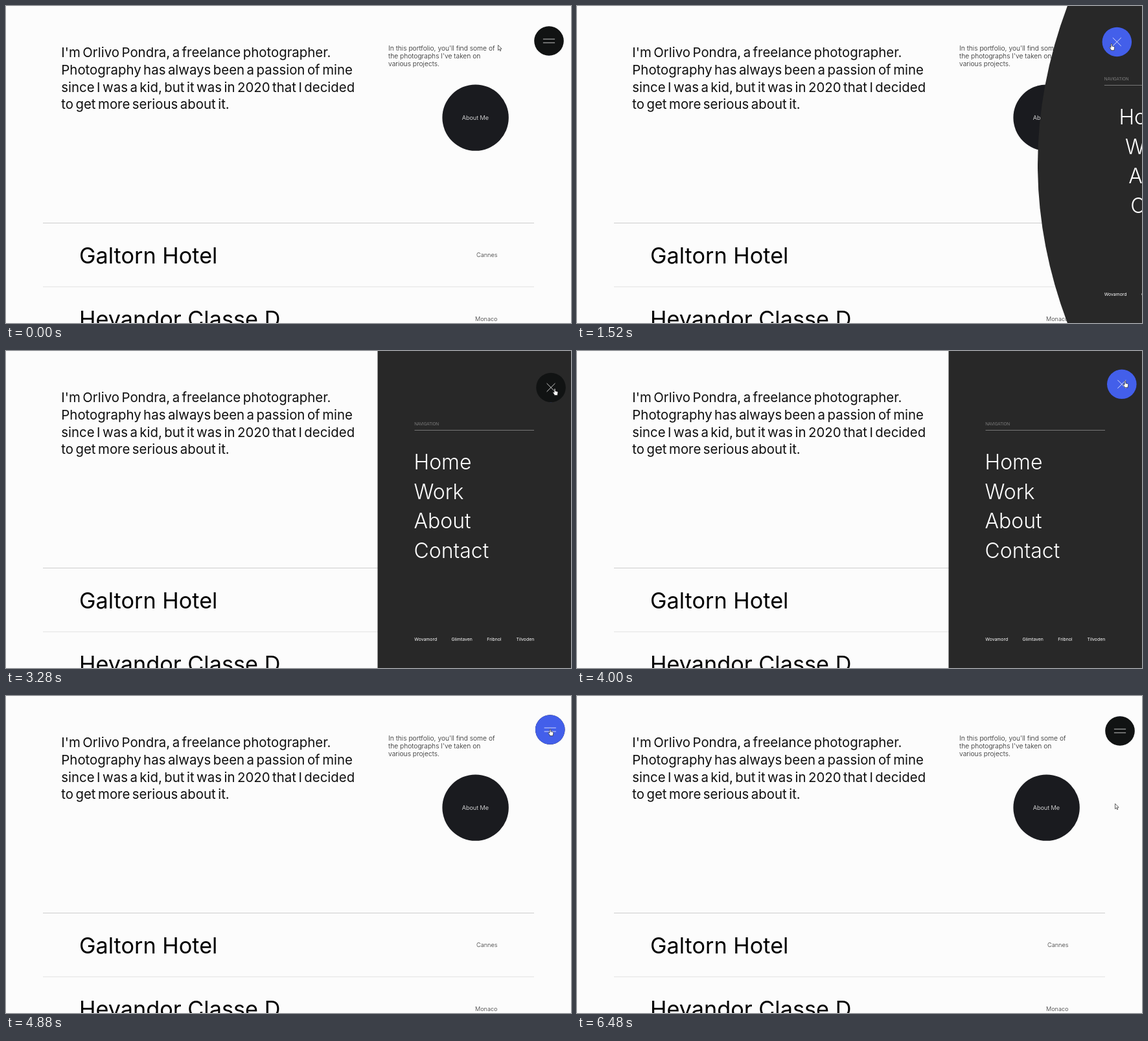
Write an HTML page that moves like this. It is 872 px wide and 490 px high and loops after 6.72 s.

```html
<!DOCTYPE html>
<html lang="en">
<head>
<meta charset="utf-8">
<title>Portfolio side menu</title>
<style>
  html, body { margin: 0; width: 100%; height: 100%; overflow: hidden; background: #fcfcfc; }
  svg { display: block; width: 872px; height: 490px; font-family: Inter, sans-serif; }
  .intro { font-size: 20.4px; word-spacing: -2.25px; fill: #0f0f0f; }
  .note { font-size: 10.28px; font-weight: 300; fill: #222; }
  .title { font-size: 34.26px; fill: #000; }
  .place { font-size: 9.13px; font-weight: 300; fill: #333; text-anchor: end; }
  .about { font-size: 9.13px; font-weight: 300; fill: #fff; text-anchor: middle; }
  .label { font-size: 6.28px; font-weight: 300; fill: #999; }
  .link { font-size: 31.98px; font-weight: 300; fill: #fff; }
  .social { font-size: 6.85px; fill: #fff; }
  .pointer { fill: #fff; stroke: #222; stroke-width: .7; stroke-linejoin: round; }
</style>
</head>
<body>
<svg viewBox="0 0 872 490">
  <defs><clipPath id="round"><circle r="22.8"/></clipPath></defs>
  <rect width="872" height="490" fill="#fcfcfc"/>

  <g class="intro">
    <text x="85.3" y="79.3">I'm Orlivo Pondra, a freelance photographer.</text>
    <text x="85.3" y="106">Photography has always been a passion of mine</text>
    <text x="85.3" y="132.6">since I was a kid, but it was in 2020 that I decided</text>
    <text x="85.3" y="159.3">to get more serious about it.</text>
  </g>
  <g class="note">
    <text x="590.1" y="68.6">In this portfolio, you'll find some of</text>
    <text x="590.1" y="81">the photographs I've taken on</text>
    <text x="590.1" y="93.4">various projects.</text>
  </g>
  <circle cx="724.6" cy="172.6" r="51.2" fill="#1a1b1f"/>
  <text class="about" x="724.4" y="176.2">About Me</text>

  <rect x="57" y="335" width="758" height="1" fill="#cdcdcd"/>
  <rect x="57" y="433.5" width="758" height="1" fill="#e2e2e2"/>
  <text class="title" x="113" y="397.6">Galtorn Hotel</text>
  <text class="title" x="113" y="496.2">Hevandor Classe D</text>
  <text class="place" x="758.5" y="388.2">Cannes</text>
  <text class="place" x="758.5" y="486.8">Monaco</text>

  <g id="panel">
    <path id="backdrop" fill="#282828"/>
    <text class="label" x="630.3" y="114.5">NAVIGATION</text>
    <rect x="630.5" y="122" width="184.5" height="1" fill="#767676"/>
    <text class="link" x="629.5" y="183">Home</text>
    <text class="link" x="629.5" y="228.5">Work</text>
    <text class="link" x="629.5" y="274">About</text>
    <text class="link" x="629.5" y="319.5">Contact</text>
    <g class="social">
      <text x="630.3" y="447.5">Wovamord</text>
      <text x="687.6" y="447.5">Glimtaven</text>
      <text x="742.3" y="447.5">Fribnol</text>
      <text x="815.2" y="447.5" text-anchor="end">Tilvoden</text>
    </g>
  </g>

  <g id="button">
    <circle r="22.8" fill="#111313"/>
    <g clip-path="url(#round)"><ellipse id="fill" ry="34.2" fill="#435fea"/></g>
    <g stroke="#fff" stroke-width=".75">
      <path id="upper" d="M-9.1 0H9.1"/>
      <path id="lower" d="M-9.1 0H9.1"/>
    </g>
  </g>

  <g id="cursor" class="pointer">
    <path id="arrow" d="M0 0V8L1.9 6.3L3.1 9.1L4.3 8.6L3.1 5.9L5.6 5.7Z"/>
    <path id="hand" d="M-.9 .8Q0-.6 .9 .8V4L3.6 4.6Q5 5 4.8 6.5L4.2 9.2V10.6H-.8V9.4L-2.9 6.4Q-3.2 5.2-2 5.3L-.9 6.3Z"/>
  </g>
</svg>

<script>
const LOOP = 6720, STEP = 80;
const OPEN = 1123, CLOSE = 4017;
const EDGE = 573.5, TRAVEL = 355.6, BULGE = 57.1, LINK_SHIFT = 45.7;
const REST = [838, 54], SIZE = 45.6, PULL = .35, LAG = 80;
const VISITS = [{ enter: 560, leave: 1840 }, { enter: 3200, leave: 5280 }];

// Stops of the pointer: time, x, y
const STOPS = [
  [0, 759.5, 60.5], [640, 820, 60], [1600, 825, 58], [2240, 835, 134],
  [2640, 820, 172], [2840, 818, 153], [3240, 847, 58], [4000, 846, 46],
  [4720, 846, 46], [4880, 840, 51], [5120, 838, 58], [6000, 830.5, 166.5]
];

const el = Object.fromEntries([...document.querySelectorAll('[id]')].map(n => [n.id, n]));
const links = [...document.querySelectorAll('.link')];
const clamp = v => Math.min(1, Math.max(0, v));
const smooth = k => k * k * (3 - 2 * k);
const move = (node, x, y, angle = 0) =>
  node.setAttribute('transform', `translate(${x} ${y}) rotate(${angle})`);

// cubic-bezier(.76, 0, .24, 1)
function ease(x) {
  x = clamp(x);
  let low = 0, high = 1;
  for (let i = 0; i < 24; i++) {
    const u = (low + high) / 2, v = 1 - u;
    if (2.28 * u * v * v + .72 * u * u * v + u ** 3 < x) low = u; else high = u;
  }
  return smooth(low);
}

// 1 while the menu is closed, 0 while it is open
function closed(t, delay = 0, enterTime = 800) {
  return t < CLOSE ? 1 - ease((t - OPEN - delay) / enterTime) : ease((t - CLOSE - delay) / 800);
}

function pointer(t) {
  const next = STOPS.findIndex(stop => stop[0] > t);
  if (next < 0) return STOPS[STOPS.length - 1].slice(1);
  const a = STOPS[next - 1], b = STOPS[next];
  const k = smooth((t - a[0]) / (b[0] - a[0]));
  return [1, 2].map(i => a[i] + (b[i] - a[i]) * k);
}

// The button is drawn towards the pointer and springs back elastically
const wobble = ms => 2 ** (-ms / 100) * Math.cos(2 * Math.PI * ms / 300);
function magnet(t, { enter, leave }) {
  if (t < enter) return REST;
  const strength = t < leave ? 1 - wobble(t - enter) : wobble(t - leave);
  const target = pointer(Math.min(t, leave) - LAG);
  return REST.map((r, i) => r + PULL * (target[i] - r) * strength);
}

// The blue disc rises in on hover and leaves upwards 300 ms after the pointer
function drawFill(t, { enter, leave }) {
  const rise = clamp((t - enter) / 400) ** 4;
  const exit = 1 - (1 - clamp((t - leave - 300) / 250)) ** 2;
  el.fill.setAttribute('cy', SIZE * 1.25 * (1 - rise - exit));
  el.fill.setAttribute('rx', SIZE / 2 * (1 + .5 * rise - .25 * exit));
}

function draw(t) {
  move(el.panel, TRAVEL * closed(t), 0);
  const control = EDGE - 2 * BULGE * closed(t, 0, 1000);
  el.backdrop.setAttribute('d', `M${EDGE} 0H930V490H${EDGE}Q${control} 245 ${EDGE} 0`);
  links.forEach((link, i) => move(link, LINK_SHIFT * closed(t, 50 * i), 0));

  const visit = VISITS[t < VISITS[1].enter ? 0 : 1];
  move(el.button, ...magnet(t, visit));
  drawFill(t, visit);
  const cross = smooth(clamp((t < CLOSE ? t - OPEN : CLOSE + 300 - t) / 300));
  move(el.upper, 0, -2.85 * (1 - cross), -45 * cross);
  move(el.lower, 0, 2.85 * (1 - cross), 45 * cross);

  move(el.cursor, ...pointer(t));
  const hovering = t >= visit.enter && t < visit.leave;
  el.hand.style.display = hovering ? '' : 'none';
  el.arrow.style.display = hovering ? 'none' : '';
}

const start = performance.now();
function tick() {
  const t = (performance.now() - start) % LOOP;
  draw(Math.floor(t / STEP) * STEP);
  requestAnimationFrame(tick);
}
tick();
</script>
</body>
</html>
```
